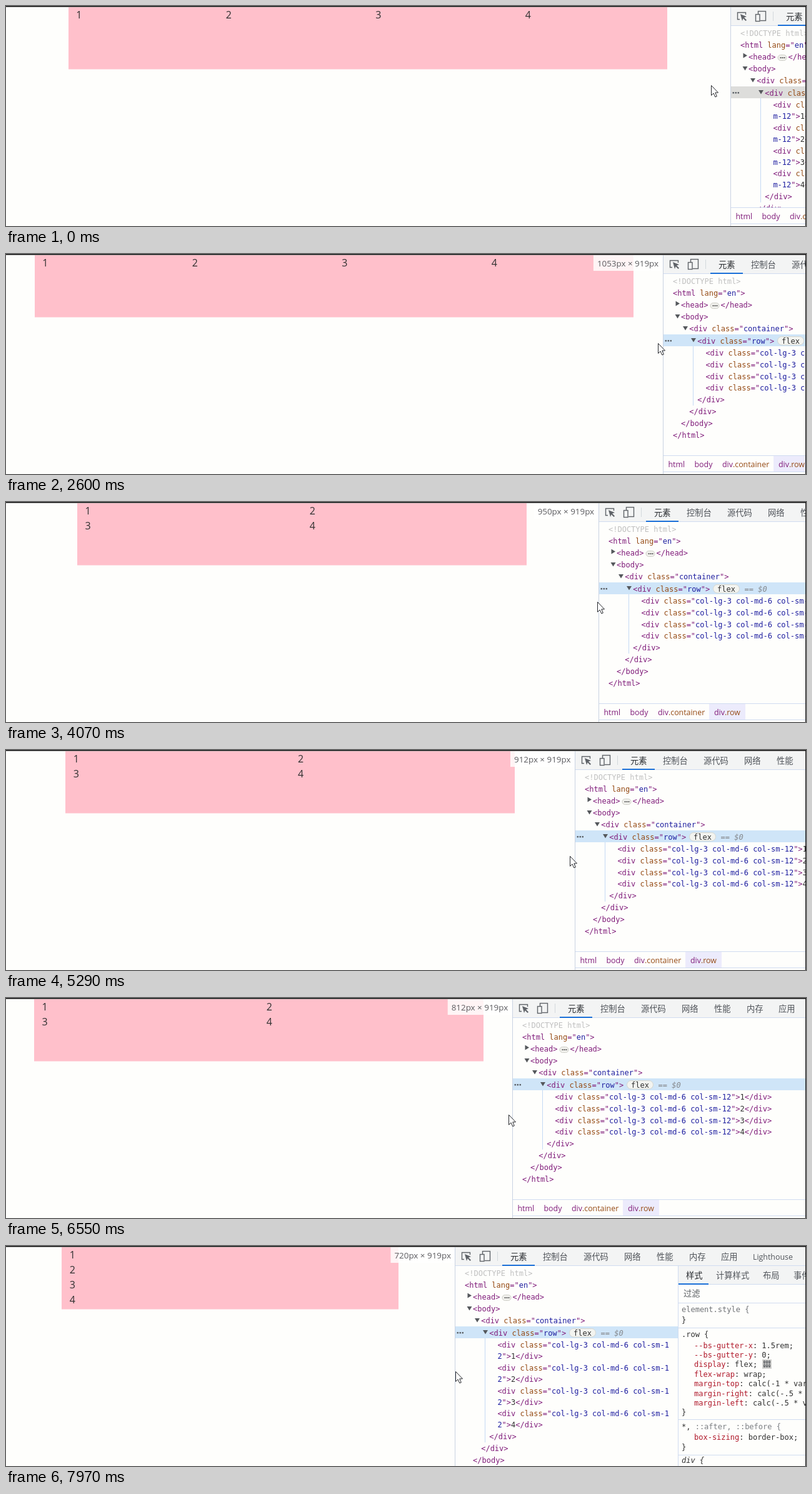
Recreate the animation shown at these times as an HTML page with a canvas. Size 1280 by 353 pixels, loop 8 s.

```html
<!DOCTYPE html>
<html lang="en">
<head>
<meta charset="utf-8">
<title>Responsive grid resize</title>
<style>
html, body { margin: 0; width: 100%; height: 100%; overflow: hidden; background: #fff; }
canvas { display: block; }
</style>
</head>
<body>
<canvas id="stage" width="1280" height="353"></canvas>
<script>
const ctx = document.getElementById('stage').getContext('2d');
const W = 1280, H = 353, LOOP = 8000, STEP = 40.7;
const SCALE = 0.998;          // page pixels to stage pixels
const WINDOW_EDGE = 1485;     // wrap edge of the tree, right of the stage
const CHAR = 7.224;
const MONO = '12px "DejaVu Sans Mono", monospace';
const UI = '"Open Sans", "Noto Sans CJK SC", "Noto Sans CJK", sans-serif';
const CJK = '13.3px "Noto Sans CJK SC", "Noto Sans CJK", sans-serif';
const TAG = '#801c7a', ATTR = '#954a14', VALUE = '#1e1ea0', INK = '#303030';
const LINE = '#d0dcf0', BAR = '#f3f4f4', PAGE = '#fefefc';

// [time, value...]
const DIVIDER = [[1305, 1158.5], [2070, 1088], [2605, 1050.5], [2890, 1024], [3700, 986],
  [4070, 947.6], [4520, 930], [5290, 910], [6140, 850], [6555, 809.45], [6960, 780],
  [7770, 774], [7930, 718.4]];
const APPROACH = [[0, 1128, 127], [40, 1128, 128], [320, 1172, 215], [650, 1182, 138],
  [940, 1182, 138], [1060, 1171, 132]];
// [time, offset from divider, y]
const DRAG = [[1300, 1, 132], [2070, -6, 138], [2600, -8, 143], [4070, -2, 160],
  [5290, -8, 170], [6550, -6, 187], [7770, -3, 200], [7930, 1, 201]];

function along(keys, t) {
  let i = 0;
  while (i < keys.length - 1 && keys[i + 1][0] <= t) i++;
  const a = keys[i], b = keys[i + 1];
  if (!b || t <= a[0]) return a.slice(1);
  const k = (t - a[0]) / (b[0] - a[0]);
  return a.slice(1).map((v, n) => v + (b[n + 1] - v) * k);
}

function rect(x, y, w, h, fill) { ctx.fillStyle = fill; ctx.fillRect(x, y, w, h); }

function text(s, x, y, font, fill) {
  ctx.font = font;
  ctx.fillStyle = fill;
  ctx.fillText(s, x, y);
}

function poly(points, fill, stroke) {
  ctx.beginPath();
  points.forEach(([x, y]) => ctx.lineTo(x, y));
  ctx.closePath();
  if (fill) { ctx.fillStyle = fill; ctx.fill(); }
  if (stroke) { ctx.strokeStyle = stroke; ctx.lineWidth = 1; ctx.stroke(); }
}

function pill(x, y, w, h, fill, stroke) {
  ctx.beginPath();
  ctx.roundRect(x, y, w, h, h / 2);
  ctx.fillStyle = fill;
  ctx.fill();
  ctx.strokeStyle = stroke;
  ctx.lineWidth = 1;
  ctx.stroke();
}

function clip(x, y, w, h, draw) {
  ctx.save();
  ctx.beginPath();
  ctx.rect(x, y, w, h);
  ctx.clip();
  draw();
  ctx.restore();
}

// Splits markup into coloured pieces.
function paint(s) {
  const parts = s.match(/"[^"]*"|\s\w+(?==)|<\/?\w+|>\d|[^"<]/g) || [];
  return parts.flatMap(p => {
    if (p[0] === '"') return [['"', TAG], [p.slice(1, -1), VALUE], ['"', TAG]];
    if (/^\s\w/.test(p)) return [[p, ATTR]];
    if (/^>\d/.test(p)) return [['>', TAG], [p[1], INK]];
    return [[p, TAG]];
  });
}

// Draws markup broken after `limit` characters; returns the number of lines.
function markup(s, x, y, limit = 999) {
  let n = 0;
  for (const [part, fill] of paint(s)) {
    for (let i = 0; i < part.length;) {
      const col = n % limit, take = Math.min(part.length - i, limit - col);
      text(part.substr(i, take), x + col * CHAR, y + Math.floor(n / limit) * 18, MONO, fill);
      i += take;
      n += take;
    }
  }
  return Math.ceil(n / limit);
}

function drawPage(x) {
  const view = x / SCALE;
  const [width, cols] = view >= 992 ? [960, 4] : view >= 768 ? [720, 2] : [540, 1];
  const w = width * SCALE, left = x / 2 - w / 2;
  rect(Math.floor(left), 2, Math.round(w), 99.5, '#ffc0cb');
  for (let i = 0; i < 4; i++) {
    const cx = left + 12 + (i % cols) * w / cols;
    text(String(i + 1), cx, 20 + Math.floor(i / cols) * 24, '16px ' + UI, INK);
  }
}

function drawSize(x) {
  const label = Math.ceil(x / SCALE) + 'px × 919px', font = '13.4px ' + UI;
  ctx.font = font;
  const left = x - 6.5 - ctx.measureText(label).width;
  rect(left - 6, 2, x - left + 6, 25, 'rgba(255,255,255,.82)');
  text(label, left, 20, font, '#5c5c60');
}

function drawIcons(x) {
  ctx.strokeStyle = '#5f6368';
  ctx.lineWidth = 1.4;
  ctx.beginPath();
  [[24.5, 14], [24.5, 10.5], [11.5, 10.5], [11.5, 21.5], [15, 21.5]]
    .forEach(([a, b]) => ctx.lineTo(x + a, b));
  ctx.stroke();
  poly([[16, 13], [26, 17], [22, 18.5], [26, 22.5], [24.5, 24], [20.5, 20], [19, 24]]
    .map(([a, b]) => [x + a, b]), '#5f6368');
  ctx.strokeRect(x + 44.5, 8.5, 12, 15);
  rect(x + 40, 13, 8, 12, BAR);
  ctx.strokeRect(x + 40.5, 13.5, 6.5, 11);
  rect(x + 68, 9, 1, 15, '#d3d8dc');
}

function drawToolbar(x) {
  rect(x, 2, W - x, 29, BAR);
  rect(x, 31, W - x, 1, LINE);
  drawIcons(x);
  const tabs = [['元素', 89], ['控制台', 141], ['源代码', 206], ['网络', 271],
    ['性能', 323], ['内存', 375], ['应用', 426]];
  tabs.forEach(([s, dx], i) => text(s, x + dx, 21.5, CJK, i ? '#50545a' : '#25282c'));
  text('Lighthouse', x + 477, 21.5, '12.4px ' + UI, '#50545a');
  rect(x + 76, 30, 52, 2, '#1a6fd8');
}

function arrowDown(x, y) { poly([[x, y], [x + 8, y], [x + 4, y + 6.5]], '#55585c'); }

function drawTree(x, right, edge, selected) {
  const at = d => x + 16 + d * 13.1;
  rect(x + 1, 129, right - x - 1, 19, selected);
  text('<!DOCTYPE html>', at(0), 48, MONO, '#c0c0c0');
  markup('<html lang="en">', at(0), 67);

  poly([[x + 20.5, 75.5], [x + 27, 79.5], [x + 20.5, 83.5]], '#55585c');
  markup('<head>', at(1), 86);
  pill(x + 76, 78.5, 14, 9, '#f0f0ec', '#cfcfc8');
  for (let i = 0; i < 3; i++) rect(x + 79.5 + i * 3, 82, 2, 2, '#666');
  markup('</head>', x + 92.5, 86);

  arrowDown(x + 19.5, 97);
  markup('<body>', at(1), 105);
  arrowDown(x + 32, 116);
  markup('<div class="container">', at(2), 124);
  arrowDown(x + 45, 135);
  for (let i = 0; i < 3; i++) rect(x + 3.5 + i * 4, 138, 2.5, 2.5, '#60666c');
  markup('<div class="row">', at(3), 144);
  pill(x + 183.5, 132.5, 42, 13.5, '#f3f4f0', '#d4d6d0');
  text('flex', x + 190, 143.5, MONO, INK);
  text('== $0', x + 233.5, 144, 'italic ' + MONO, '#85888c');

  const limit = Math.floor((edge - at(4)) / CHAR);
  let y = 163;
  for (let i = 1; i <= 4; i++) {
    const lines = markup(`<div class="col-lg-3 col-md-6 col-sm-12">${i}</div>`, at(4), y, limit);
    y += 18.8 + (lines - 1) * 18;
  }
  rect(x + 48, 148, 1, y - 143, '#c4d9f4');
  ['</div>', '</div>', '</body>', '</html>'].forEach((s, i) =>
    markup(s, at(3 - i), Math.round(y + i * 18.9)));
}

function drawCrumbs(x) {
  rect(x, 323, W - x, 1, LINE);
  rect(x + 177, 324, 58, 25, '#ecebfc');
  rect(x, 349, W - x, 1, LINE);
  const font = '12.4px ' + UI;
  text('html', x + 8.5, 342, font, TAG);
  text('body', x + 50.5, 342, font, TAG);
  ['container', 'row'].forEach((name, i) => {
    const left = x + 95 + i * 90;
    text('div', left, 342, font, TAG);
    text('.' + name, left + ctx.measureText('div').width, 342, font, ATTR);
  });
}

function drawStyles(s) {
  rect(s, 32, W - s, 29, BAR);
  rect(s, 61, W - s, 1, LINE);
  [['样式', 12], ['计算样式', 60], ['布局', 135], ['事件监听器', 184]].forEach(([name, dx], i) =>
    text(name, s + dx, 52, CJK, i ? '#50545a' : '#25282c'));
  rect(s, 60, 48, 2, '#1a6fd8');
  text('过滤', s + 8, 81, CJK, '#5a5e62');
  [91, 131, 278, 335].forEach(y => rect(s, y, W - s, 1, LINE));

  const line = (str, y, fill = INK) => text(str, s + 5, y + 4, MONO, fill);
  const prop = (name, value, y) => {
    text(name, s + 25, y + 4, MONO, '#b0182a');
    text(': ' + value + ';', s + 25 + name.length * CHAR, y + 4, MONO, INK);
  };
  line('element.style {', 102, '#6f7276');
  line('}', 119);
  line('.row {', 142);
  [['--bs-gutter-x', '1.5rem'], ['--bs-gutter-y', '0'], ['display', 'flex'],
    ['flex-wrap', 'wrap'], ['margin-top', 'calc(-1 * var(--bs-gutter-y))'],
    ['margin-right', 'calc(-.5 * var(--bs-gutter-x))'],
    ['margin-left', 'calc(-.5 * var(--bs-gutter-x))']
  ].forEach(([name, value], i) => prop(name, value, 159.5 + i * 15.4));
  rect(s + 134, 182, 15, 15, '#d0d0ce');
  for (let i = 0; i < 6; i++) {
    ctx.strokeStyle = '#55585c';
    ctx.lineWidth = 1;
    ctx.strokeRect(s + 136.5 + (i % 3) * 4, 184.5 + Math.floor(i / 3) * 6, 2, 3.5);
  }
  line('}', 267);
  line('*,', 290);
  line('   ::after, ::before {', 290, '#7c7f83');
  prop('box-sizing', 'border-box', 307);
  line('}', 323);
  text('div {', s + 5, 348, 'italic ' + MONO, INK);
}

function drawPanel(x, selected) {
  const split = x < 766, side = x + 358;
  rect(x, 2, W - x, H - 2, PAGE);
  const right = split ? side : W;
  const bottom = split ? H : 323;
  clip(x + 1, 32, right - x - 1, bottom - 32, () =>
    drawTree(x, right, split ? side - 11 : WINDOW_EDGE, selected));
  if (split) {
    drawStyles(side);
    rect(side - 1, 32, 1, H - 32, LINE);
  } else {
    drawCrumbs(x);
  }
  drawToolbar(x);
  rect(x, 2, 1, H - 2, '#c9d2e2');
}

function drawArrow(x, y) {
  poly([[0.5, 0.5], [0.5, 16.5], [4, 13], [6.8, 19], [9.3, 18], [6.8, 12], [11.5, 12]]
    .map(([a, b]) => [x + a, y + b]), '#fff', '#26282c');
}

function drawResize(x, y) {
  const half = [[-11, 0], [-6, -5], [-6, -1.7], [6, -1.7], [6, -5], [11, 0]];
  const all = half.concat(half.slice(1, 5).reverse().map(([a, b]) => [a, -b]));
  poly(all.map(([a, b]) => [x + a, y + b + 0.5]), '#fff', '#26282c');
}

function render(t) {
  const edge = along(DIVIDER, t)[0], x = Math.round(edge);
  const dragging = t > 1320;
  rect(0, 0, W, H, PAGE);
  drawPage(edge);
  if (dragging) drawSize(edge);
  drawPanel(x, t < 940 ? '#dddddb' : '#cfe5f8');
  rect(0, 0, W, 1.5, '#0c0c0c');
  rect(W - 1, 0, 1, H, '#161616');

  if (dragging) {
    const [dx, y] = along(DRAG, t);
    drawArrow(Math.round(x + dx), Math.round(y));
  } else {
    const [cx, cy] = along(APPROACH, t).map(Math.round);
    (t < 1020 ? drawArrow : drawResize)(cx, cy);
  }
}

const start = performance.now();
function tick() {
  const t = (performance.now() - start) % LOOP;
  render(Math.floor((t + 8) / STEP) * STEP);
  requestAnimationFrame(tick);
}
tick();
</script>
</body>
</html>
```
